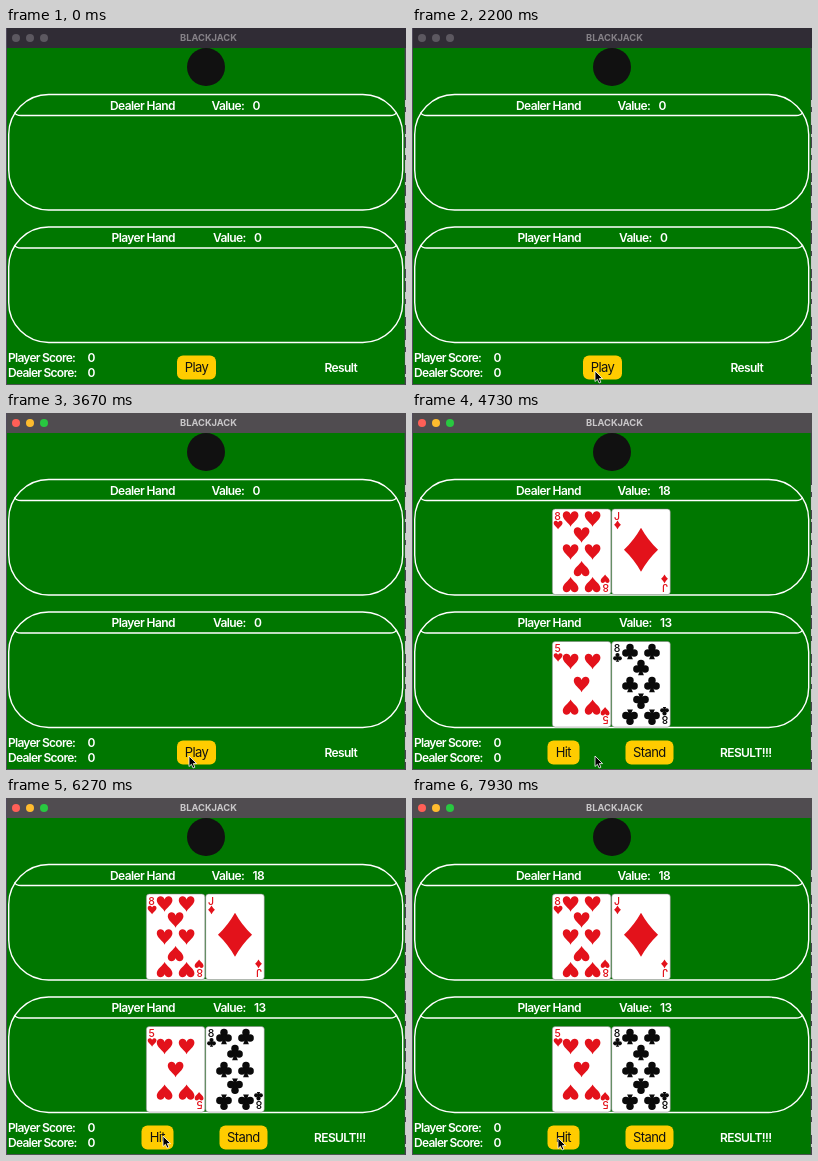
Write an HTML page that moves like this. It is 400 px wide and 357 px high and loops after 8 s.

```html
<!DOCTYPE html>
<html lang="en">
<head>
<meta charset="utf-8">
<title>Blackjack</title>
<style>
  html, body { margin: 0; width: 100%; height: 100%; overflow: hidden; background: #007700; }
  svg { display: block; width: 100vw; height: 100vh; }
  text { font-family: Inter, Roboto, sans-serif; font-size: 12px; font-weight: 600; letter-spacing: -.6px; fill: #fff; }
  .score { letter-spacing: -.75px; }
  .title { font-size: 9.3px; font-weight: 700; letter-spacing: 0; text-anchor: middle; }
  .button text { font-size: 13px; font-weight: 400; text-anchor: middle; fill: #111; }
  .rank { font-size: 10.5px; font-weight: 500; letter-spacing: 0; text-anchor: middle; fill: inherit; }
  .button rect { fill: #ffcc00; }
  .hand { fill: none; stroke: #fff; stroke-width: 1.4; }
</style>
</head>
<body>
<svg viewBox="0 0 400 357" preserveAspectRatio="none">
  <defs>
    <path id="heart" d="M0 8C-2 4-8 1-8-3.500C-8-8.500-1.500-9 0-4.500C1.500-9 8-8.500 8-3.500C8 1 2 4 0 8Z"/>
    <path id="diamond" d="M0-8Q2.500-3.500 6.200 0Q2.500 3.500 0 8Q-2.500 3.500-6.200 0Q-2.500-3.500 0-8Z"/>
    <g id="club">
      <circle cy="-4" r="3.800"/><circle cx="-4.200" cy="1.800" r="3.800"/><circle cx="4.200" cy="1.800" r="3.800"/>
      <path d="M-1.500-2H1.500Q.8 5 3 8H-3Q-.8 5-1.500-2Z"/>
    </g>
    <g id="hand" class="hand">
      <rect x="2.700" y="66.500" width="394" height="115.500" rx="40"/>
      <path d="M8.500 84.500Q10 87.500 15 87.500H384Q389 87.500 390.500 84.500"/>
    </g>
  </defs>

  <rect width="400" height="357" fill="#007700"/>
  <rect width="400" height="20" id="bar"/>
  <g id="lights"></g>
  <text class="title" id="title" x="202.500" y="13.300">BLACKJACK</text>
  <path d="M.5 0V357" stroke="#514b5c"/>
  <path d="M0 356.500H400" stroke="#4b5650"/>
  <path d="M399.300 20V357" stroke="#47434e" stroke-width="1.400"/>
  <path d="M399.500 72V357" stroke="#c9c9c9" stroke-dasharray="7 5 13 9 3 11"/>
  <circle cx="200" cy="39" r="19" fill="#111"/>

  <use href="#hand"/>
  <use href="#hand" y="132.500"/>
  <text x="104" y="82.300">Dealer Hand</text>
  <text x="205.500" y="82.300">Value:</text>
  <text x="246.500" y="82.300" id="dealerValue"></text>
  <text x="105.500" y="213.800">Player Hand</text>
  <text x="207" y="213.800">Value:</text>
  <text x="248" y="213.800" id="playerValue"></text>
  <text class="score" x="2" y="333.700">Player Score:</text>
  <text x="81.500" y="333.700">0</text>
  <text class="score" x="2" y="349.200">Dealer Score:</text>
  <text x="81.500" y="349.200">0</text>

  <g id="before">
    <g class="button"><rect x="171" y="327.500" width="39" height="24" rx="6"/><text x="190.500" y="344">Play</text></g>
    <text x="318.500" y="343.500">Result</text>
  </g>
  <g id="after">
    <g id="cards"></g>
    <g class="button"><rect x="135.500" y="327.500" width="32" height="24" rx="6"/><text x="151.300" y="344">Hit</text></g>
    <g class="button"><rect x="213.500" y="327.500" width="48" height="24" rx="6"/><text x="237.300" y="344">Stand</text></g>
    <text x="308" y="343.500">RESULT!!!</text>
  </g>
  <path id="cursor" d="M0 0V10.500L2.400 8.300L4.100 12L5.900 11.200L4.300 7.600H7.600Z" fill="#000" stroke="#fff" stroke-width=".8"/>
</svg>
<script>
const LOOP = 8000, FOCUS = 2930, DEAL = 4200;
const byId = id => document.getElementById(id);
const RED = '#e3121b', BLACK = '#0a0a0a';

const pip = (suit, x, y, scale = 1, flip = false) =>
  `<use href="#${suit}" transform="translate(${x} ${y}) rotate(${flip ? 180 : 0}) scale(${scale})"/>`;

// Pip positions are relative to the card centre; those in the lower half are inverted.
const layouts = {
  5: [[-11, -23], [11, -23], [0, 0], [-11, 23], [11, 23]],
  8: [[-11, -33], [11, -33], [0, -17], [-11, 0], [11, 0], [0, 17], [-11, 33], [11, 33]]
};

function card(rank, suit, x, y) {
  const corner = `<text class="rank" x="-24" y="-32">${rank}</text>` + pip(suit, -23.5, -27, .55);
  const body = layouts[rank]
    ? layouts[rank].map(([px, py]) => pip(suit, px, py, .98, py > 0)).join('')
    : pip(suit, 0, -2, 2.75);
  return `<g transform="translate(${x} ${y})" fill="${suit === 'club' ? BLACK : RED}">
    <rect x="-29.300" y="-42.800" width="58.600" height="85.600" rx="3" fill="#fff" stroke="#777" stroke-width=".5"/>
    ${body}${corner}<g transform="rotate(180)">${corner}</g></g>`;
}

byId('cards').innerHTML =
  card(8, 'heart', 169.6, 138.8) + card('J', 'diamond', 229, 138.8) +
  card(5, 'heart', 169.6, 271.3) + card(8, 'club', 229, 271.3);

byId('lights').innerHTML = [10, 24, 38].map(x => `<circle cx="${x}" cy="10" r="4"/>`).join('');
const lights = [...byId('lights').children];
const lightColors = ['#ff5f57', '#febc2e', '#28c840'];

// Cursor tip: time, x, y
const path = [
  [0, 170, 372], [560, 170, 372], [730, 174, 355], [1450, 183, 343],
  [5070, 183, 343], [6100, 157, 338], [6350, 157, 338], [7000, 146, 340], [LOOP, 146, 340]
];

function cursorAt(t) {
  const i = path.findIndex(point => point[0] > t);
  const [t0, x0, y0] = path[i - 1], [t1, x1, y1] = path[i];
  const u = (t - t0) / (t1 - t0), ease = u * u * (3 - 2 * u);
  return [x0 + (x1 - x0) * ease, y0 + (y1 - y0) * ease];
}

function draw() {
  const t = performance.now() % LOOP;
  const active = t >= FOCUS, dealt = t >= DEAL;
  byId('bar').setAttribute('fill', active ? '#504c50' : '#302c35');
  byId('title').style.fill = active ? '#c9c7c9' : '#858187';
  lights.forEach((light, i) => light.setAttribute('fill', active ? lightColors[i] : '#5c5860'));
  byId('before').style.display = dealt ? 'none' : '';
  byId('after').style.display = dealt ? '' : 'none';
  byId('dealerValue').textContent = dealt ? 18 : 0;
  byId('playerValue').textContent = dealt ? 13 : 0;
  byId('cursor').setAttribute('transform', `translate(${cursorAt(t).join(' ')})`);
  requestAnimationFrame(draw);
}
draw();
</script>
</body>
</html>
```
